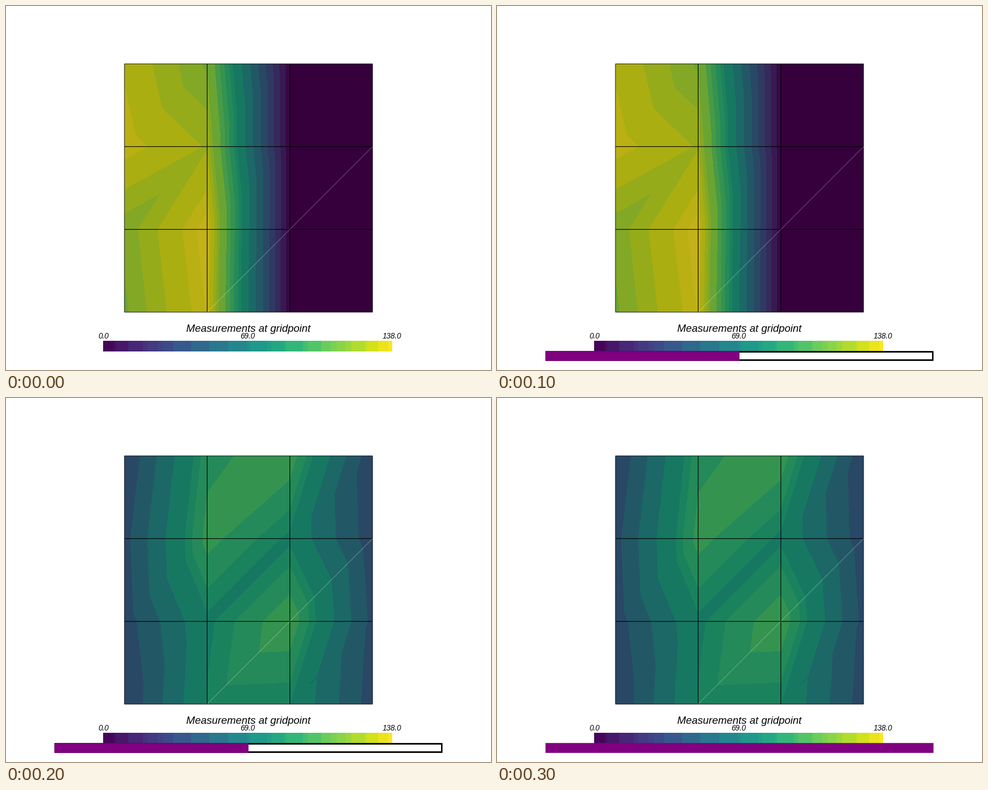
These frames come from a looping animation (864x648 px, 400 ms). A matplotlib script:

```python
import numpy as np
import matplotlib
import matplotlib.pyplot as plt
from matplotlib.animation import FuncAnimation
from matplotlib.patches import Rectangle

W, H, DPI = 864, 648, 100
PX = 72 / DPI  # points per pixel
X0, Y0, SIDE = 211, 103, 442
X1, Y1, CELL = X0 + SIDE, Y0 + SIDE, SIDE / 3
VMAX = 138
TINT = np.array([0.78, 0.77, 0.72])  # warm light on the surface
viridis = matplotlib.colormaps["viridis"]

# measurements at the 4 x 4 grid points, top row first
FIELDS = [
    np.array([[131.1, 115.9, 0, 0],
              [134.6, 125.5, 0, 0],
              [118.0, 138.0, 0, 0],
              [115.8, 135.7, 0, 0]]),
    np.array([[34.0, 89.2, 97.3, 36.3],
              [40.5, 95.0, 78.4, 37.4],
              [38.4, 78.4, 98.3, 41.0],
              [34.0, 81.0, 80.3, 38.6]]),
]

# band limits: widening steps in the blues, even in green, close in yellow
k = np.arange(8)
LEVELS = np.r_[0.1, 6.6 + 8 * k + 0.36 * k**2, 85 + 6.8 * k[:4],
               116.8, 121.2, 126, 132, 135.4]

# per loop step: which field, and how much of the progress bar is filled
STEPS = [(0, None), (0, 0.5), (1, 0.5), (1, 1.0)]


def band_colors():
    edges = np.r_[0, LEVELS, VMAX]
    tone = edges[:-1] + 0.7 * np.diff(edges)
    return viridis(tone / VMAX)[:, :3] * TINT


def surface(points):
    """Linear interpolation over two triangles per cell, cut into bands."""
    t = (np.arange(SIDE) + 0.5) / SIDE * 3
    cell = t.astype(int)
    c, r = np.meshgrid(cell, cell)
    fx, fy = np.meshgrid(t - cell, t - cell)
    tl, tr = points[r, c], points[r, c + 1]
    bl, br = points[r + 1, c], points[r + 1, c + 1]
    upper = tl + fx * (tr - tl) + fy * (bl - tl)
    lower = br + (1 - fx) * (bl - br) + (1 - fy) * (tr - br)
    value = np.where(fx + fy < 1, upper, lower)
    return band_colors()[np.searchsorted(LEVELS, value)]


def color_scale(n):
    """Viridis row, averaged wherever its coarse RGB cell stays the same."""
    rgb = viridis(np.linspace(0, 1, n))[:, :3]
    cell = rgb * 255 // [32, 16, 32]
    cuts = np.flatnonzero(np.diff(cell, axis=0).any(axis=1)) + 1
    runs = [np.tile(s.mean(axis=0), (len(s), 1)) for s in np.split(rgb, cuts)]
    return np.concatenate(runs)[None]


fig = plt.figure(figsize=(W / DPI, H / DPI), dpi=DPI, facecolor="white")
ax = fig.add_axes([0, 0, 1, 1])
ax.axis("off")


def picture(data, x0, y0, x1, y1):
    return ax.imshow(data, extent=(x0, x1, y1, y0), aspect="auto",
                     interpolation="nearest", zorder=1)


def line(x, y, color, width, alpha=1.0, z=3):
    return ax.plot(x, y, color=color, lw=width * PX, alpha=alpha, zorder=z,
                   snap=False, solid_capstyle="butt")[0]


def box(x, y, w, h, color, z):
    return ax.add_patch(Rectangle((x, y), w, h, fc=color, lw=0, zorder=z,
                                  snap=False))


def label(x, y, text, size):
    ax.text(x, y, text, fontsize=size * PX, family="Liberation Sans",
            style="italic", ha="center", va="baseline", zorder=5)


images = [surface(f) for f in FIELDS]
mesh = picture(images[0], X0, Y0, X1, Y1)
picture(color_scale(515), 173, 596, 688, 615)
ax.set_xlim(0, W)
ax.set_ylim(H, 0)

# cell edges and the light diagonal
for i in range(4):
    alpha = 1 if i in (1, 2) else 0.8
    x, y = X0 + i * CELL, Y0 + i * CELL
    line([x, x], [Y0, Y1], "black", 1.1, alpha)
    line([X0, X1], [y, y], "black", 1.1, alpha)
line([X0 + CELL, X1], [Y1, Y0 + CELL], "white", 0.6, 0.5, 4)
nicks = [line([x, x + 12], [y, y - 12], "#1b4f55", 0.8, 0.8, 2)
         for x, y in ((541, 509), (632, 418))]

label(432, 579.5, "Measurements at gridpoint", 18.75)
for i in range(3):
    label(173.5 + 257 * i, 591.5, f"{VMAX * i / 2:.1f}", 13.5)

# progress bar spans the middle 80 % of the stage
BAR_X, BAR_W = 0.1 * W, 0.8 * W
bar = [box(BAR_X, 614.2, BAR_W, 17.6, "black", 6),
       box(BAR_X + 2.6, 617, BAR_W - 5.2, 12, "white", 7),
       box(BAR_X, 614.2, 0, 17.6, "purple", 8)]


def draw(i):
    field, progress = STEPS[i % len(STEPS)]
    mesh.set_data(images[field])
    for nick in nicks:
        nick.set_visible(field == 1)
    for part in bar:
        part.set_visible(progress is not None)
    bar[0].set_visible(progress is not None and progress < 1)
    bar[2].set_width(BAR_W * (progress or 0))
    return [mesh, *nicks, *bar]


anim = FuncAnimation(fig, draw, frames=len(STEPS), interval=100, repeat=True,
                     repeat_delay=0, init_func=lambda: draw(0), blit=False)
plt.show()
```
